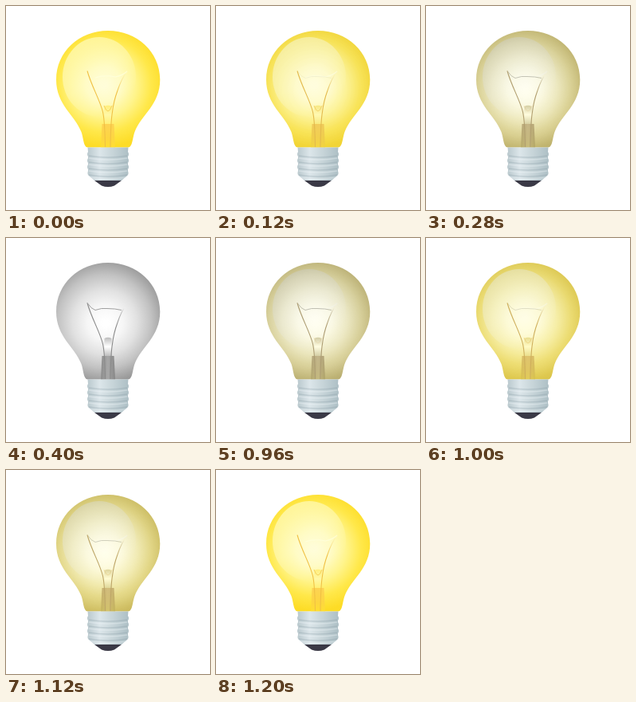
Animation of 256 by 256 pixels, one loop 1920 ms. Source, as an HTML page with a canvas:

```html
<!DOCTYPE html>
<html lang="en">
<head>
<meta charset="utf-8">
<title>Flickering light bulb</title>
<style>
html, body { margin: 0; width: 100%; height: 100%; overflow: hidden; background: #fff; }
canvas { display: block; width: 100vw; height: 100vh; }
</style>
</head>
<body>
<canvas id="stage" width="256" height="256"></canvas>
<script>
const SIZE = 256, LOOP = 1920, STEP = 40;
const ctx = document.getElementById('stage').getContext('2d');

const glass = new Path2D(
  'M128 31 C91.5 31 63 57.5 63 92.5 C63 124 86.5 137 94.5 158 ' +
  'C97.5 166 97 177.5 103 177.5 L153 177.5 C159 177.5 158.5 166 161.5 158 ' +
  'C169.5 137 193.3 124 193.3 92.5 C193.3 57.5 164.5 31 128 31 Z');
const shine = new Path2D();
shine.ellipse(117, 89, 46, 50, 0, 0, Math.PI * 2);
const leftWire = new Path2D('M102 81.5 C107 100 118 118 121.5 133 Q124 144 124.5 177');
const rightWire = new Path2D('M152 82 Q145 91 140 106 C136 117 134.5 124 133.5 133 Q131.5 144 131 177');
const coil = new Path2D('M102 81.5 Q107 89 112 90.5 Q120 87.5 127 88.5 Q137 88.5 145 90.5');
const litCoil = new Path2D('M112 90 Q124 86 137 89 Q145 88 152 82');
const stem = new Path2D('M120.5 148 L135.5 148 L137 177.5 L119 177.5 Z');
const drop = new Path2D('M123.5 126 Q128 123.5 132.5 126 L133 148 L123 148 Z');
const screw = new Path2D(
  'M102.5 177.5 L153.5 177.5 L153 183 Q155 186 153 189 L153 191 Q155 194 153 197 ' +
  'L153 199 Q155 202 153 205 L153 207 Q154.5 211 152 213 L145 219 L111 219 L104 213 ' +
  'Q101.5 211 103 207 L103 205 Q101 202 103 199 L103 197 Q101 194 103 191 ' +
  'L103 189 Q101 186 103 183 Z');
const tip = new Path2D('M111 219 L145 219 L136 225.5 Q128 228.5 120 225.5 Z');

function blend(g, stops) {
  stops.forEach(([at, color]) => g.addColorStop(at, color));
  return g;
}

function layer(paint) {
  const c = document.createElement('canvas');
  c.width = c.height = SIZE;
  paint(c.getContext('2d'));
  return c;
}

function line(g, path, color, width) {
  g.strokeStyle = color;
  g.lineWidth = width;
  g.lineCap = 'butt';
  g.lineJoin = 'round';
  g.stroke(path);
}

function fill(g, path, style) {
  g.fillStyle = style;
  g.fill(path);
}

const base = layer(g => {
  fill(g, screw, blend(g.createLinearGradient(102, 0, 154, 0), [
    [0, '#b9c8cd'], [0.3, '#dce6ea'], [0.55, '#cbd8dc'], [1, '#adbfc5']]));
  for (let y = 188; y < 214; y += 8) {
    line(g, new Path2D(`M104 ${y} Q128 ${y + 4} 152 ${y}`), 'rgba(133,154,163,.3)', 1.3);
    line(g, new Path2D(`M104 ${y + 3} Q128 ${y + 7} 152 ${y + 3}`), 'rgba(240,247,249,.35)', 1.5);
  }
  fill(g, tip, '#3a3946');
});

const lit = layer(g => {
  fill(g, glass, blend(g.createRadialGradient(122, 98, 4, 124, 100, 77), [
    [0, '#fffde0'], [0.25, '#fffbc4'], [0.5, '#fff48c'],
    [0.75, '#ffe84a'], [1, '#fddc26']]));
  fill(g, shine, blend(g.createLinearGradient(88, 50, 142, 122), [
    [0, 'rgba(255,249,176,.8)'], [0.5, 'rgba(255,252,200,.5)'], [1, 'rgba(255,252,200,0)']]));
  fill(g, drop, blend(g.createLinearGradient(0, 125, 0, 148), [
    [0, 'rgba(255,236,110,.8)'], [0.5, 'rgba(255,248,170,.8)'], [1, 'rgba(255,240,120,.7)']]));
  fill(g, stem, blend(g.createLinearGradient(0, 148, 0, 178), [
    [0, '#fdd354'], [0.6, '#fdd640'], [1, '#ffdf30']]));
  line(g, litCoil, 'rgba(255,255,222,.8)', 1.1);
  line(g, leftWire, '#f0c044', 1.1);
  line(g, rightWire, blend(g.createLinearGradient(0, 82, 0, 108), [
    [0, 'rgba(255,252,200,.8)'], [1, '#f0c044']]), 1.1);
  line(g, new Path2D('M123 125 Q128 139 133 125'), '#f6d058', 1);
});

const dark = layer(g => {
  fill(g, glass, blend(g.createRadialGradient(125, 107, 4, 123, 104, 77), [
    [0, '#ffffff'], [0.25, '#f6f6f6'], [0.5, '#e1e1e1'],
    [0.75, '#c2c2c2'], [1, '#999999']]));
  fill(g, stem, blend(g.createLinearGradient(119, 0, 137, 0), [
    [0, '#8c8c8c'], [0.5, '#a8a8a8'], [1, '#868686']]));
  fill(g, drop, blend(g.createLinearGradient(0, 125, 0, 150), [
    [0, '#bdbdbd'], [0.45, '#ffffff'], [1, '#b4b4b4']]));
  line(g, leftWire, '#8a8a8a', 1.1);
  line(g, rightWire, blend(g.createLinearGradient(0, 88, 0, 112), [
    [0, 'rgba(190,190,190,0)'], [0.2, '#bebebe'], [1, '#8a8a8a']]), 1.1);
  line(g, coil, '#a0a0a0', 1);
});

function brightness(time) {
  const t = Math.floor(time / STEP) * STEP;
  if (t < 120) return 1;
  if (t < 400) return 1 - ((t - 120) / STEP + 1) / 8;
  if (t < 960) return 0;
  if (t < 1040) return ((t - 960) / STEP + 1) / 3;
  if (t < 1200) return 0.5 + Math.abs(t - 1120) / 160;
  return 1;
}

function put(image, alpha, mode) {
  ctx.globalAlpha = alpha;
  ctx.globalCompositeOperation = mode;
  ctx.drawImage(image, 0, 0);
}

function draw(time) {
  const level = brightness(time);
  ctx.clearRect(0, 0, SIZE, SIZE);
  put(lit, level, 'source-over');
  put(dark, 1 - level, 'lighter');
  put(base, 1, 'source-over');
}

const start = performance.now();
function tick() {
  draw((performance.now() - start) % LOOP);
  requestAnimationFrame(tick);
}
tick();
</script>
</body>
</html>
```
